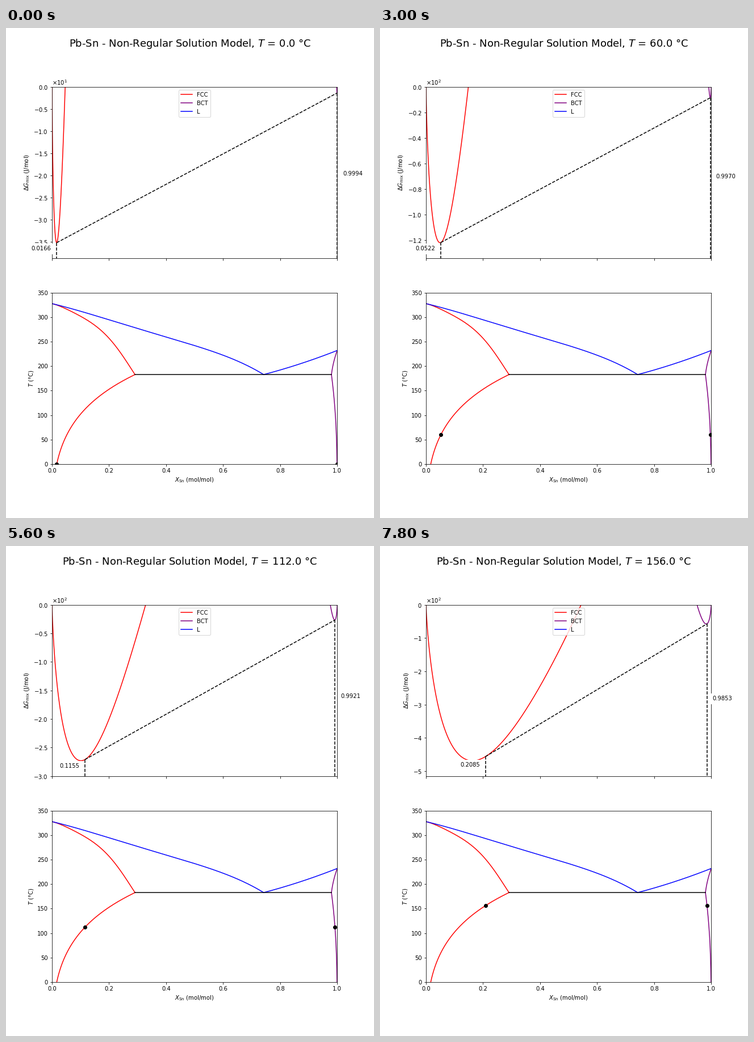
Write a matplotlib script that moves like this. It is 648 by 864 pixels and loops after 8000 ms.

```python
import numpy as np
import matplotlib.pyplot as plt
from matplotlib.animation import FuncAnimation

R = 8.314
T_EUT = 182.7      # eutectic temperature, deg C
X_EUT = 0.742      # eutectic composition
MELT_PB, MELT_SN = 327.5, 231.9
T_REF = 429.15     # K, expansion point of the solvus fits
FRAMES, STEP = 40, 4.0


def fcc_solvus(t):
    v = 1000 * (1 / (t + 273.15) - 1 / T_REF)
    q = 2.35787 - 0.58771 * v + 0.26058 * v**2 - 0.0576 * v**3
    return 0.2085 * np.exp(-v * q)


def bct_solvus(t):
    v = 1000 * (1 / (t + 273.15) - 1 / T_REF)
    return 1 - 0.0147 * np.exp(-v * (2.335 + 0.04 * v))


def curve(xs, ys, deg, n=200):
    x = np.linspace(xs[0], xs[-1], n)
    return x, np.polyval(np.polyfit(xs, ys, deg), x)


def mixing(x):
    x = np.clip(x, 1e-12, 1 - 1e-12)
    return x * np.log(x) + (1 - x) * np.log(1 - x)


def model(t):
    """Free energy curves and common tangent at t deg C."""
    tk = t + 273.15
    rt, dt = R * tk, T_REF - tk
    b, c = 6375 + 11.8 * dt, 350 + 8 * dt
    bz = 15000
    x1, x2 = fcc_solvus(t), bct_solvus(t)
    z = 1 - x2

    # tangent intercepts at x = 0 and x = 1
    p = rt * np.log(1 - x1) + b * x1**2 - 2 * c * x1**3
    q = rt * np.log(1 - z) + bz * z**2
    m = q - p

    a = m - rt * np.log(x1 / (1 - x1)) + 2 * b * x1 - 3 * c * x1**2
    az = -m - rt * np.log(z / (1 - z)) + 2 * bz * z
    g_fcc = rt * mixing(X) + X * (a - b * X + c * X**2)
    g_bct = rt * mixing(Z) + Z * (az - bz * Z)
    return g_fcc, g_bct, (x1, x2), (p + m * x1, p + m * x2)


X = (1 - np.cos(np.linspace(0, np.pi, 2501))) / 2
Z = 0.2 * np.linspace(0, 1, 1501)**2

fig, (top, low) = plt.subplots(2, 1, sharex=True, figsize=(9, 12), dpi=72)
title = fig.suptitle("", fontsize=18)

# free energy panel
fcc, = top.plot([], [], color="red", label="FCC")
bct, = top.plot([], [], color="purple", label="BCT")
top.plot([], [], color="blue", label="L")
tangent, drop1, drop2 = [top.plot([], [], "k--")[0] for _ in range(3)]
label1 = top.text(0, 0, "", ha="right", backgroundcolor="w")
label2 = top.text(0, 0, "", ha="left", backgroundcolor="w")
top.set_ylabel(r"$\Delta G_\mathrm{mix}$ (J/mol)")
top.ticklabel_format(axis="y", style="sci", scilimits=(0, 0),
                     useMathText=True)
top.legend(loc="upper center")

# phase diagram panel
x_a, x_b = fcc_solvus(T_EUT), bct_solvus(T_EUT)
t_solid = np.linspace(0, T_EUT, 200)
low.plot(fcc_solvus(t_solid), t_solid, color="red")
low.plot(*curve([0, 0.05, 0.1, 0.15, 0.2, 0.25, x_a],
                [MELT_PB, 316.5, 302, 283, 257, 219, T_EUT], 5), color="red")
low.plot(bct_solvus(t_solid), t_solid, color="purple")
t_sn, x_sn = curve([T_EUT, 207, MELT_SN], [x_b, 0.9873, 1], 2)
low.plot(x_sn, t_sn, color="purple")
low.plot(*curve([0, 0.1, 0.2, 0.3, 0.4, 0.5, 0.6, 0.7, X_EUT],
                [MELT_PB, 312, 294.5, 276.7, 259.5, 242, 222, 196.8, T_EUT],
                5), color="blue")
low.plot(*curve([X_EUT, 0.82, 0.9, 1], [T_EUT, 195.5, 210.5, MELT_SN], 2),
         color="blue")
low.plot([x_a, x_b], [T_EUT, T_EUT], color="black")
dots, = low.plot([], [], "ko")
low.set_xlim(0, 1)
low.set_ylim(0, 350)
low.set_xlabel(r"$X_\mathrm{Sn}$ (mol/mol)")
low.set_ylabel("$T$ (°C)")


def update(i):
    t = STEP * i
    g_fcc, g_bct, xs, ys = model(t)
    floor = 1.1 * min(g_fcc.min(), g_bct.min())
    fcc.set_data(X, g_fcc)
    bct.set_data(1 - Z, g_bct)
    tangent.set_data(xs, ys)
    parts = zip((drop1, drop2), (label1, label2), xs, ys, (-0.02, 0.02))
    for drop, label, x, y, shift in parts:
        drop.set_data([x, x], [y, floor])
        label.set_position((x + shift, (y + floor) / 2))
        label.set_text(f"{x:.4f}")
    dots.set_data(xs, [t, t])
    top.set_ylim(floor, 0)
    title.set_text(f"Pb-Sn - Non-Regular Solution Model, $T$ = {t:.1f} °C")
    return fcc, bct, tangent, drop1, drop2, label1, label2, dots, title


anim = FuncAnimation(fig, update, frames=FRAMES, init_func=lambda: update(0),
                     interval=200, repeat=True, repeat_delay=0, blit=False)
plt.show()
```
